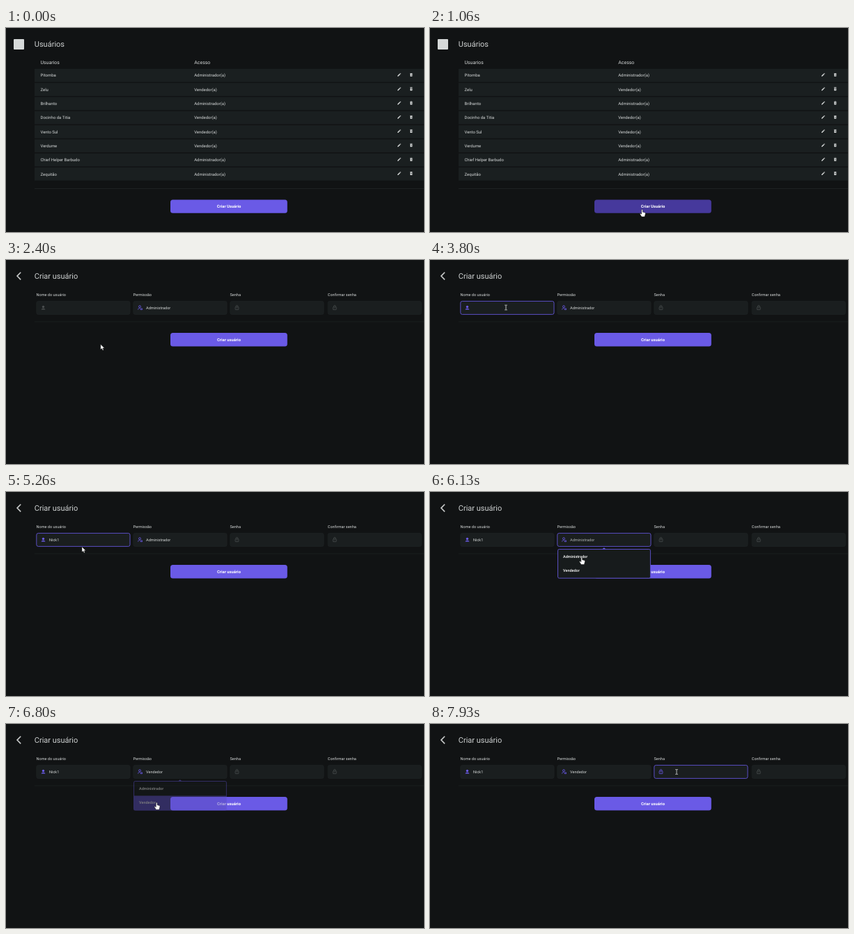
An HTML page for the animation above (8 s loop, 600 by 294 pixels).

```html
<!DOCTYPE html>
<html lang="pt-BR">
<head>
<meta charset="utf-8">
<title>Usuários</title>
<style>
  html, body { margin: 0; height: 100%; overflow: hidden; background: #111314; }
  svg { display: block; width: 100vw; height: 100vh; }
  text { font-family: Roboto, sans-serif; fill: #d6d9d9; text-rendering: geometricPrecision; }
  .title { font-size: 11px; fill: #cfd2d2; }
  .head { font-size: 6.95px; }
  .cell { font-size: 5.95px; }
  .label, .value { font-size: 5.57px; }
  .option { font-size: 5.5px; font-weight: 500; fill: #fff; }
  .btn { font-size: 5.85px; font-weight: 700; fill: #fff; text-anchor: middle; }
  .line { fill: none; stroke: currentColor; stroke-width: .8; }
</style>
</head>
<body>
<svg viewBox="0 0 600 294" preserveAspectRatio="none">
  <defs>
    <path id="pencil" fill="#d6d9d9" d="M3 17.25V21h3.75L17.81 9.94l-3.75-3.75zM20.71 7.04a1 1 0 0 0 0-1.41l-2.34-2.34a1 1 0 0 0-1.41 0l-1.83 1.83 3.75 3.75z"/>
    <g id="trash">
      <path fill="#d6d9d9" d="M6 19a2 2 0 0 0 2 2h8a2 2 0 0 0 2-2V7H6zM19 4h-3.5l-1-1h-5l-1 1H5v2h14z"/>
      <path stroke="#1a1f20" stroke-width="2" d="M9 10.5l6 6m0-6l-6 6"/>
    </g>
    <g id="user" fill="currentColor">
      <circle cx="0" cy="-1.2" r="1.7"/>
      <path d="M-2.8 2.9v-.6Q-2 1 0 1t2.8 1.3v.6z"/>
    </g>
    <g id="role" class="line">
      <circle cx="-.5" cy="-1.5" r="1.5"/>
      <path d="M-2.8 2.9V2q.4-1.2 2.4-1.2M.6 2.9h2.4V1.2H.6z"/>
    </g>
    <g id="lock" class="line">
      <rect x="-2.4" y="-.9" width="4.8" height="3.8" rx=".5"/>
      <path d="M-1.4-.9v-1a1.4 1.4 0 0 1 2.8 0v1M0 .5v1"/>
    </g>
  </defs>

  <g id="list">
    <rect x="11" y="16" width="15" height="15" rx="1" fill="#d6d9d9"/>
    <text class="title" x="40.8" y="27.2">Usuários</text>
    <text class="head" x="49.5" y="51.9">Usuarios</text>
    <text class="head" x="270.3" y="51.9">Acesso</text>
    <g id="rows"></g>
    <path stroke="#222627" stroke-width=".8" d="M41 231.5h559"/>
    <rect id="create" x="236" y="247.4" width="167.8" height="19.3" rx="3.5"/>
    <text class="btn" x="320" y="259.1">Criar Usuário</text>
  </g>

  <g id="form">
    <path fill="none" stroke="#c6c8c8" stroke-width="1.6" d="M21.2 17.8l-5.2 5.3 5.2 5.3"/>
    <text class="title" x="40.8" y="27.2">Criar usuário</text>
    <g id="fields"></g>
    <path id="caret" stroke="#e8eaea" stroke-width=".7" d="M0 65.8v6.2"/>
    <path stroke="#1e2122" stroke-width=".8" d="M41 89h559"/>
    <rect x="236" y="105" width="167.8" height="19.4" rx="3.5" fill="#6a5ae6"/>
    <text class="btn" x="320" y="116.6">Criar usuário</text>
    <g id="menu">
      <path fill="#6a5ae6" d="M247 82.6l2.8-2.4 2.8 2.4z"/>
      <rect x="183.5" y="82.5" width="132.9" height="41.7" rx="2" fill="#171b1c"/>
      <rect id="pick" x="183.5" y="103.4" width="132.9" height="20.8" fill="#5a4cbd"/>
      <rect x="183.5" y="82.5" width="132.9" height="41.7" rx="2" fill="none" stroke="#6355d6" stroke-width=".9"/>
      <text class="option" x="191" y="94.7">Administrador</text>
      <text class="option" x="191" y="115.2">Vendedor</text>
    </g>
  </g>

  <g id="cursor">
    <path id="arrow" fill="#fff" stroke="#111" stroke-width=".4" d="M0 0v7.6l1.8-1.6 1.2 2.8 1.3-.6-1.2-2.7h2.4z"/>
    <path id="hand" fill="#fff" stroke="#111" stroke-width=".5" d="M-.9.7Q0-.5.9.7v3l3 .8q1 .4.9 1.5l-.6 2.5-.6 2H-.7L-3.2 6.6q-.1-1.2 1-.9l1.3 1z"/>
    <path id="beam" fill="none" stroke="#e4e6e6" stroke-width=".8" d="M-1.8-3.4H-.5L0-3l.5-.4h1.3M0-3v6M-1.8 3.4H-.5L0 3l.5.4h1.3"/>
  </g>
</svg>
<script>
const LOOP = 8000, PAGE = 1800, FOCUS = 3200, OPEN = 5800, PICK = 6730, PASSWORD = 7560;
const VIOLET = '#6a5ae6', BLINK = 530;
const $ = id => document.getElementById(id);

const people = [
  ['Pitomba', 1], ['Zelu', 0], ['Brilhanto', 1], ['Docinho da Titia', 0],
  ['Vento Sul', 0], ['Verdume', 0], ['Chief Helper Barbudo', 1], ['Zequitão', 1]
];
$('rows').innerHTML = people.map(([name, admin], i) => {
  const y = 68.3 + i * 20.3;
  return `<rect x="41" y="${y - 9.4}" width="559" height="18.8" fill="#1a1f20"/>
    <text class="cell" x="49.5" y="${y + 2.1}">${name}</text>
    <text class="cell" x="270.2" y="${y + 2.1}">${admin ? 'Administrador' : 'Vendedor'}(a)</text>
    <use href="#pencil" transform="translate(561.2 ${y - 4.1}) scale(.27)"/>
    <use href="#trash" transform="translate(578.4 ${y - 4.1}) scale(.27)"/>`;
}).join('');

const fields = [
  [43.5, 'Nome do usuário', 'user'], [182.5, 'Permissão', 'role'],
  [321.5, 'Senha', 'lock'], [461.8, 'Confirmar senha', 'lock']
];
$('fields').innerHTML = fields.map(([x, label, icon], i) =>
  `<text class="label" x="${x}" y="52.1">${label}</text>
   <rect id="box${i}" x="${x + .3}" y="59.4" width="134.2" height="19" rx="2.5" fill="#1a1e1f" stroke-width=".9"/>
   <use id="icon${i}" href="#${icon}" x="${x + 10}" y="68.7"/>
   <text id="value${i}" class="value" x="${x + 18.6}" y="70.6"></text>`).join('');

// Pointer stops: time, x, y
const path = [
  [60, 57, 37], [860, 306, 250], [1060, 304.5, 261.5], [1400, 304.5, 261.5], [1730, 306, 254],
  [2130, 306, 254], [2400, 135.8, 121.5], [2800, 109, 68.5], [5190, 109, 68.5],
  [5260, 109, 79], [5340, 109, 79], [5730, 222, 71], [5900, 222, 71], [6130, 217.7, 94],
  [6260, 217.7, 94], [6460, 216.2, 113], [6860, 216.2, 113], [7060, 238, 96],
  [7180, 238, 96], [7520, 354, 69], [LOOP, 354, 69]
];
const keys = [4000, 4200, 4330, 4460, 4660], word = 'Nick1';

const ramp = (t, start, length) => Math.min(1, Math.max(0, (t - start) / length));
const mix = (a, b, k) => a + (b - a) * k;
const show = (id, on) => $(id).setAttribute('opacity', +on);
const within = (x, y, l, t, r, b) => x >= l && x <= r && y >= t && y <= b;

function pointer(t) {
  const i = Math.max(1, path.findIndex(p => p[0] > t));
  const [t0, x0, y0] = path[i - 1], [t1, x1, y1] = path[i];
  const k = ramp(t, t0, t1 - t0), e = k * k * (3 - 2 * k);
  return [mix(x0, x1, e), mix(y0, y1, e)];
}

function drawCursor(t, x, y) {
  const form = t >= PAGE, menu = t >= OPEN && t < PICK + 100;
  const hand = form
    ? within(x, y, 182, 59, 317, 79) || menu && within(x, y, 183, 82, 317, 125)
    : within(x, y, 236, 247, 404, 267);
  const beam = form && !hand && within(x, y, 43, 59, 597, 78.5);
  show('hand', hand);
  show('beam', beam);
  show('arrow', !hand && !beam);
  show('cursor', t >= 60);
  $('cursor').setAttribute('transform', `translate(${x} ${y})`);
}

function drawForm(t, y) {
  const typed = keys.filter(k => k <= t).length;
  const open = t >= OPEN && t < PICK;
  const focus = [t >= FOCUS && t < OPEN, t >= OPEN && t < PICK + 70, t >= PASSWORD, false];
  const lit = [t >= FOCUS, true, focus[2], false];
  fields.forEach((_, i) => {
    $('box' + i).setAttribute('stroke', focus[i] ? '#6355d6' : '#1d2223');
    $('icon' + i).setAttribute('color', lit[i] ? VIOLET : '#4a4e4f');
  });
  $('value0').textContent = word.slice(0, typed);
  $('value1').textContent = t < PICK ? 'Administrador' : 'Vendedor';
  $('value1').style.fill = open ? '#b2b5b5' : '';

  const lastKey = typed ? keys[typed - 1] : FOCUS + 60;
  const width = typed ? $('value0').getComputedTextLength() : 0;
  show('caret', focus[0] && t >= lastKey && t - lastKey < BLINK);
  $('caret').setAttribute('transform', `translate(${62.6 + width} 0)`);

  show('menu', ramp(t, OPEN, 130) - ramp(t, PICK, 130));
  show('pick', t > OPEN + 130 ? ramp(y, 102, 4) * (t < PICK + 130) : 0);
}

function frame(now) {
  const t = now % LOOP, [x, y] = pointer(t);
  const form = t >= PAGE;
  $('list').style.display = form ? 'none' : '';
  $('form').style.display = form ? '' : 'none';
  const h = ramp(t, 790, 200);
  $('create').setAttribute('fill', `rgb(${mix(106, 70, h)},${mix(90, 57, h)},${mix(230, 156, h)})`);
  if (form) drawForm(t, y);
  drawCursor(t, x, y);
  requestAnimationFrame(frame);
}
frame(0);
</script>
</body>
</html>
```
